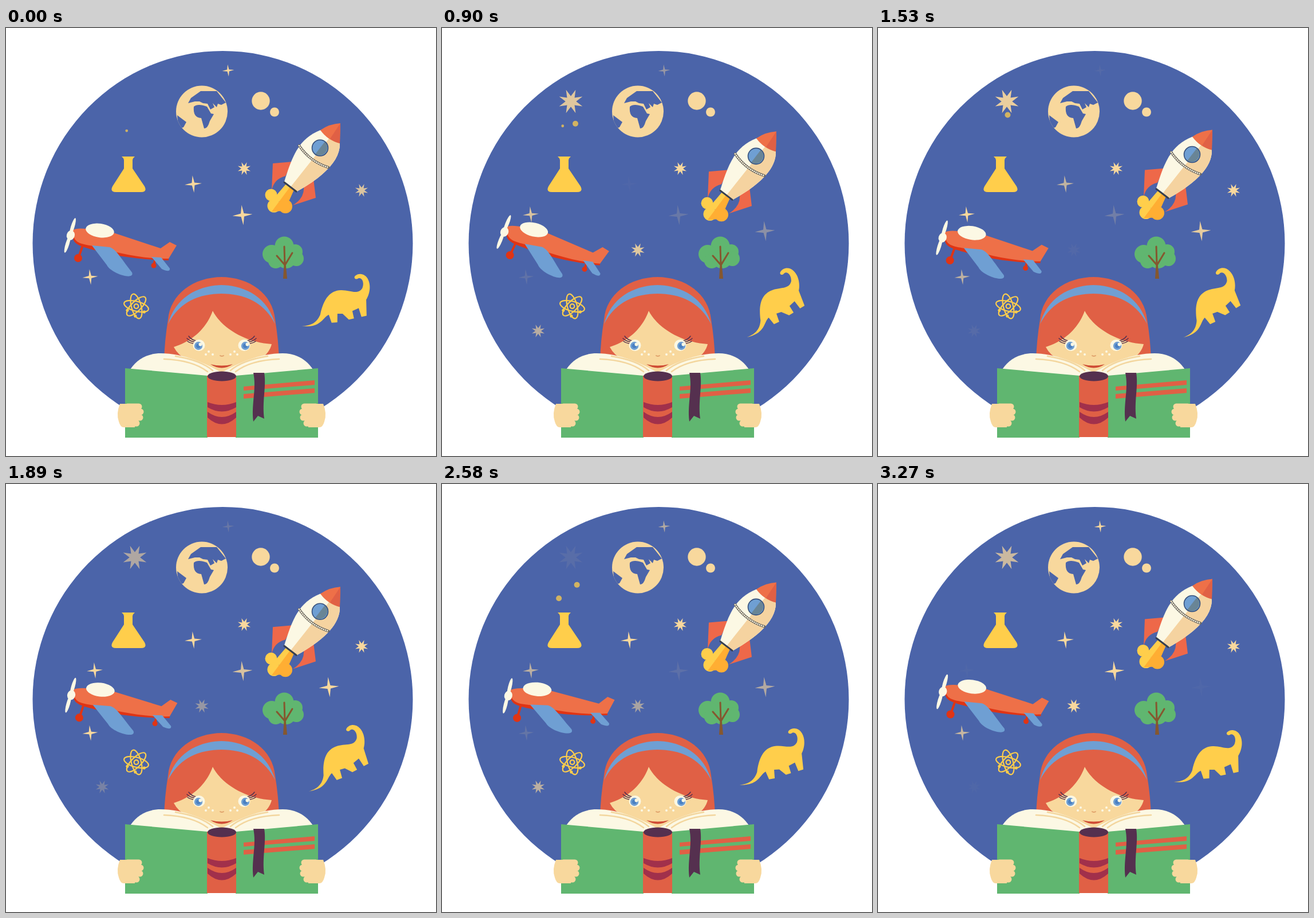
Write an HTML page that moves like this. It is 751 px wide and 746 px high and loops after 3300 ms.

```html
<!DOCTYPE html>
<html lang="en">
<head>
<meta charset="utf-8">
<title>Reading girl</title>
<style>
html, body { margin: 0; width: 100%; height: 100%; overflow: hidden; background: #fff }
svg { display: block; width: 100vw; height: 100vh }
.sky { fill: #4b64a9 }
.tan { fill: #f8d89d }
.cream { fill: #fcf8e4 }
.gold { fill: #ffce4b }
.amber { fill: #ffae33 }
.hair { fill: #e06045 }
.orange { fill: #ee7048 }
.red { fill: #e03414 }
.blue { fill: #6f9fd3 }
.green { fill: #60b670 }
.plum { fill: #55304f }
.wine { fill: #a1304b }
.line { fill: none; stroke-linecap: round }
</style>
</head>
<body>
<svg viewBox="0 0 751 746">
  <defs><clipPath id="disc"><circle cx="342" cy="145.5" r="45"/></clipPath></defs>
  <ellipse class="sky" cx="378.5" cy="375.5" rx="332" ry="335.5"/>
  <g id="stars" class="tan"></g>

  <g class="tan">
    <circle cx="342" cy="145.5" r="45"/>
    <circle cx="445" cy="127" r="15.7"/>
    <circle cx="469" cy="146.5" r="8"/>
  </g>
  <g class="sky" clip-path="url(#disc)">
    <path d="M328 137Q335 131 351 137L358 149 363 150 356 162Q352 176 346 175L341 157Q326 156 328 137Z"/>
    <path d="M318 131L323 122 340 110 368 110 384 130 376 134 370 132 368 138 361 131 364 138 357 142 352 132 344 131 338 128 330 128Z"/>
    <path d="M299 152L315 164 310 173 301 176Z"/>
  </g>

  <path class="gold" d="M202 224H225Q222 226 221 230V245L242 276Q247 286 236 286H192Q181 286 186 276L206 245V230Q205 226 202 224Z"/>
  <g id="bubbles" class="gold"></g>
  <g id="atom" class="line" stroke="#ffce4b" stroke-width="2.2" transform="translate(227.5 485)"><circle r="3.8"/></g>

  <g class="green">
    <circle cx="486" cy="380" r="16.5"/><circle cx="464" cy="394" r="16"/><circle cx="471" cy="406" r="13"/>
    <circle cx="505" cy="390" r="13"/><circle cx="507" cy="402" r="13"/><circle cx="489" cy="401" r="18"/>
  </g>
  <path class="line" stroke="#85572f" stroke-width="3" d="M486 381L487 413 473 397M500 392L488 412"/>
  <path fill="#85572f" d="M484 437L486 405H488L491 437Z"/>

  <g id="dino" class="gold">
    <path d="M517 520C535 520 544 512 549 500 555 470 567 458 584 457 600 456 614 466 622 453 626 443 621 434 615 436 611 439 606 436 609 432 617 425 628 429 632 438 638 450 634 465 629 473L630 501 621 503 616 488 605 493 608 506 599 508 588 498H579V513L569 514 564 500C553 505 550 524 517 520Z"/>
  </g>

  <g id="rocket">
    <path fill="#ee6849" d="M466 236L501 233 488 258Q468 263 464 283ZM537 263L541 296 501 309Q522 296 520 276Z"/>
    <g class="gold">
      <path d="M489 272L503 282 490 305 465 300Z"/>
      <circle cx="463" cy="291" r="10.5"/><circle cx="468" cy="310" r="11.5"/>
    </g>
    <path class="amber" d="M496 277L503 282 495 300 482 319 464 320Z"/>
    <circle class="amber" cx="488" cy="311" r="12"/>
    <path class="cream" d="M549 178C515 192 502 215 486 268L508 285C560 256 584 228 583 201Z"/>
    <path fill="#f5d3a0" d="M567 189L497 277 508 285C560 256 584 228 583 201Z"/>
    <path class="orange" d="M549 178Q565 167 584 166L583 201Q562 196 549 178Z"/>
    <path class="hair" d="M584 166L583 201Q574 199 566 193Z"/>
    <path class="line" stroke="#6b6862" stroke-width="4.5" d="M512 205Q531 233 563 243"/>
    <path class="line" stroke="#fbf3da" stroke-width="2.6" stroke-dasharray=".1 3.4" d="M512 205Q531 233 563 243"/>
    <path class="line" stroke="#363f50" stroke-width="3" d="M486 269L507 285"/>
    <circle class="blue" cx="548.5" cy="209" r="14"/>
    <path fill="#698596" d="M557 198A14 14 0 0 1 540 220Z"/>
    <circle class="line" stroke="#36507c" stroke-width="1.6" cx="548.5" cy="209" r="14"/>
  </g>

  <g id="plane">
    <path class="line" stroke="#e03414" stroke-width="4" d="M133 382L127 399M261 402L258 413"/>
    <circle class="red" cx="126" cy="401" r="7"/>
    <circle class="red" cx="258" cy="414" r="4.5"/>
    <path class="red" d="M117 364C117 376 128 380 150 386 195 399 240 404 284 405V400Z"/>
    <path class="orange" d="M117 352Q126 345 188 357L270 384 286 373 298 379 284 402C240 403 190 391 152 380 130 376 116 375 117 352Z"/>
    <path class="blue" d="M150 379L181 382C192 386 197 396 220 426 226 441 183 428 176 413ZM254 399L271 400 286 419Q287 427 272 420Z"/>
    <ellipse class="cream" cx="164" cy="353" rx="25" ry="12" transform="rotate(8 164 353)"/>
    <g class="cream" transform="rotate(17 112 361)">
      <ellipse cx="112" cy="346" rx="3.2" ry="16"/>
      <ellipse cx="112" cy="377" rx="3.2" ry="16"/>
      <ellipse cx="113" cy="361" rx="7" ry="8.5"/>
    </g>
  </g>

  <g id="hood">
    <path class="hair" d="M276 580Q277 545 283 508C287 464 327 434 378 434V580Z"/>
    <path class="blue" d="M283 516C297 465 342 448 378 448V463Q310 463 283 516Z"/>
  </g>
  <use href="#hood" transform="matrix(-1 0 0 1 753 0)"/>
  <path class="tan" d="M361 493C350 524 325 546 293 556Q300 570 318 580L377 606 440 580Q460 568 464 551C420 548 378 525 361 493Z"/>
  <path class="line" stroke="#e2a56e" stroke-width="2" d="M374 571Q377 573 380 571"/>
  <path fill="#cf4b34" d="M357 586Q377 591 396 586 377 599 357 586Z"/>

  <g id="half">
    <path class="line" stroke="#55304f" stroke-width="1.5" d="M331 545Q323 543 319 537M329 547Q321 546 316 541M328 550Q321 549 317 546"/>
    <g class="cream">
      <ellipse cx="337" cy="553" rx="10.5" ry="10"/>
      <circle cx="349" cy="569" r="2"/><circle cx="354" cy="564" r="2"/><circle cx="361" cy="569" r="2"/>
      <path d="M217 595C230 575 250 567 270 567 310 567 350 585 377 601V608H340Z"/>
    </g>
    <path class="line" stroke="#f3d69e" stroke-width="2.6" d="M276 577Q326 579 352 599M296 572Q340 579 361 597"/>
    <path class="green" d="M208 593L352 606V714H208Z"/>
    <path class="tan" d="M199 655Q192 672 197 686 200 697 207 696H225V655Z"/>
    <path class="line" stroke="#f8d89d" stroke-width="11" d="M212 660H232M212 669H235M212 679H234M212 689H228"/>
  </g>
  <use href="#half" transform="matrix(-1 0 0 1 753 0)"/>
  <g id="iris">
    <circle class="blue" cx="336" cy="554" r="7.2"/>
    <circle fill="#4a80c2" cx="336" cy="554" r="4"/>
    <circle class="cream" cx="339.5" cy="551.5" r="3"/>
  </g>
  <use href="#iris" x="82"/>

  <path class="hair" d="M351 606H402V713H351ZM415 625L539 614V622L415 632ZM415 638L539 628V636L415 646Z"/>
  <ellipse class="plum" cx="377" cy="607" rx="25" ry="8.5"/>
  <path class="wine" d="M352 652Q377 662 402 652V661Q377 676 352 661ZM352 669Q377 687 402 669V679Q377 702 352 679Z"/>
  <path class="plum" d="M432 601H451C455 625 447 650 451 681L440 676 432 686C428 655 438 630 432 601Z"/>
</svg>
<script>
const LOOP = 3300, STEP = 30, { PI, sin, cos, abs, min } = Math;
const $ = id => document.getElementById(id);

function add(parent, tag, attrs) {
  const el = document.createElementNS('http://www.w3.org/2000/svg', tag);
  for (const k in attrs) el.setAttribute(k, attrs[k]);
  return parent.appendChild(el);
}

// Four points lean slightly left, eight have two tips on top
function star(x, y, points, r) {
  const [inner, lean] = points === 4 ? [0.22, -0.09] : [0.42, PI / 8];
  const corners = Array.from({ length: points * 2 }, (_, i) => {
    const a = i * PI / points + lean, q = i % 2 ? r * inner : r;
    return [x + q * sin(a), y - q * cos(a)];
  });
  return add($('stars'), 'polygon', { points: corners.join(' ') });
}

star(416, 245, 8, 12);

// Each star goes dark at the given moments and recovers over its ramp
const twinkles = [];
function twinkle(x, y, points, r, ramp, ...darks) {
  twinkles.push({ el: star(x, y, points, r), ramp, darks });
}
twinkle(388, 74, 4, 10.5, 1600, 1620);
twinkle(225, 128, 8, 22, 1050, 0, 2500);
twinkle(327, 272, 4, 15, 900, 920);
twinkle(413, 326, 4, 17.5, 600, 1000, 1400, 2640);
twinkle(621, 283, 8, 12, 600, 500, 900, 2580);
twinkle(155, 325, 4, 14, 1100, 0, LOOP);
twinkle(147, 434, 4, 13.5, 800, 1000, 2700);
twinkle(168, 528, 8, 12, 1100, 0, 1600, LOOP);
twinkle(342, 387, 8, 12.5, 700, 0, 1500, 2200);
twinkle(564, 354, 4, 17.5, 1200, 0, 450, LOOP);

// Bubbles rise and sway while they live
const bubbles = [];
function bubble(x, y, r, rise, birth, life) {
  bubbles.push({ el: add($('bubbles'), 'circle', { r }), x, y, rise, birth, life });
}
bubble(211, 180, 2.4, 12, -100, 1300);
bubble(228, 185, 5, 40, 150, 1650);
bubble(233, 192, 5, 24, 1900, 1000);
bubble(204, 201, 5, 3, 2000, 1000);

for (const tilt of [15, 75, 135]) {
  const ring = add($('atom'), 'g', { transform: `rotate(${tilt})` });
  add(ring, 'ellipse', { rx: 22, ry: 8.5 });
  add(ring, 'circle', { cx: 16, cy: 6, r: 1.5 });
}

// Two harmonics of the loop around a mean
function wave(t, mean, c1, s1, c2 = 0, s2 = 0) {
  const a = 2 * PI * t / LOOP;
  return mean + c1 * cos(a) + s1 * sin(a) + c2 * cos(2 * a) + s2 * sin(2 * a);
}

function draw(t) {
  for (const { el, ramp, darks } of twinkles) {
    const gap = min(...darks.map(d => abs(t - d)));
    el.setAttribute('opacity', min(1, gap / ramp));
  }
  for (const { el, x, y, rise, birth, life } of bubbles) {
    const age = t - birth, u = age / life;
    el.setAttribute('cx', x + rise / 8 * sin((age - 525) * PI / 450));
    el.setAttribute('cy', y - rise * u);
    el.setAttribute('opacity', u > 0 && u < 1 ? min(0.75, 3 * sin(PI * u)) : 0);
  }
  const tilt = wave(t, 0.5, 0.2, 4.1, -0.7, 0.9);
  const lift = wave(t, 2.3, -2.3, -0.7);
  $('plane').setAttribute('transform', `translate(${-tilt} ${lift}) rotate(${tilt} 204.5 369.5)`);
  $('rocket').setAttribute('transform', `translate(0 ${wave(t, 8.6, -6, 3.3, -2.6, 3)})`);
  $('dino').setAttribute('transform', `rotate(${wave(t, -10.4, 9.5, -6, 1.5)} 581 483)`);
}

const start = performance.now();
function frame() {
  const t = (performance.now() - start) % LOOP;
  draw(Math.floor(t / STEP) * STEP);
  requestAnimationFrame(frame);
}
frame();
</script>
</body>
</html>
```
